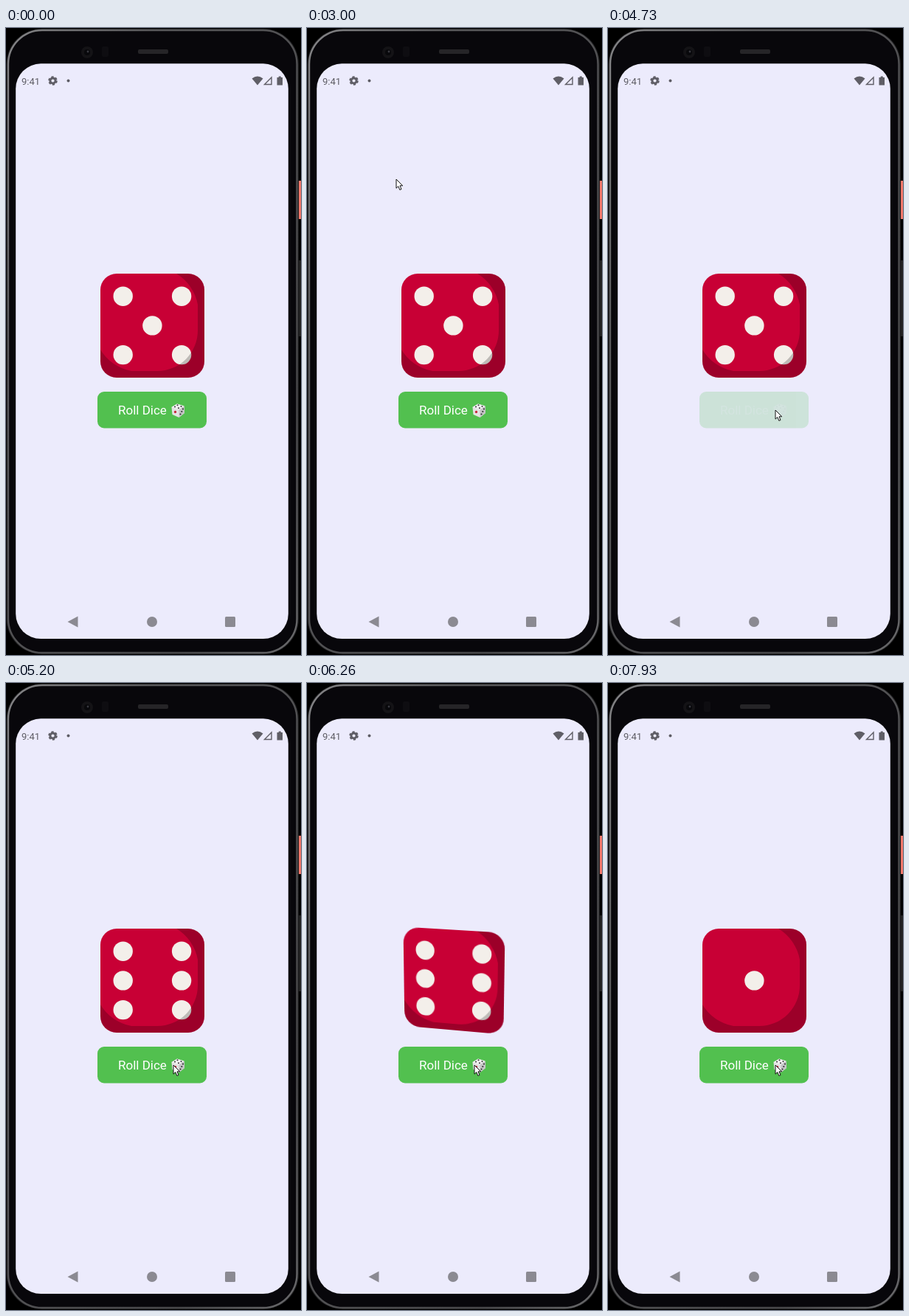
Animation of 400x850 px, one loop 8 s. Source, as an HTML page:

```html
<!DOCTYPE html>
<html lang="en">
<head>
<meta charset="utf-8">
<title>Roll Dice</title>
<style>
  html, body { margin: 0; width: 100%; height: 100%; overflow: hidden; background: #000; }
  #stage { position: relative; width: 400px; height: 850px; overflow: hidden; }
  svg { position: absolute; left: 0; top: 0; }
  text { font-family: Roboto, sans-serif; }
  #die {
    position: absolute; left: 127.5px; top: 333.2px; width: 140.5px; height: 140.5px;
    border-radius: 22px; overflow: hidden; background: #c80035;
  }
</style>
</head>
<body>
<div id="stage">
  <svg width="400" height="850">
    <defs>
      <linearGradient id="rim" x1="0" y1="0" x2="1" y2="1">
        <stop offset="0" stop-color="#858587"/>
        <stop offset=".25" stop-color="#59595b"/>
        <stop offset=".8" stop-color="#48484a"/>
        <stop offset="1" stop-color="#6a6a6c"/>
      </linearGradient>
    </defs>
    <!-- phone body -->
    <rect x="396" y="207" width="6" height="52" rx="1" fill="#f0776a"/>
    <rect x="397" y="315" width="3" height="103" fill="#222"/>
    <rect x=".5" y="1" width="396.5" height="848" rx="48" fill="#1b1b1d"/>
    <rect x="3" y="3" width="391.5" height="844" rx="46" fill="#08070b" stroke="url(#rim)" stroke-width="2.4"/>
    <circle cx="110" cy="33" r="8" fill="#141316"/>
    <circle cx="110" cy="33" r="4" fill="#08080b"/>
    <circle cx="111" cy="32" r="1.4" fill="#3a3a40"/>
    <rect x="130" y="25" width="9" height="14" rx="2" fill="#0e0d11"/>
    <rect x="179" y="29" width="41" height="6" rx="2" fill="#262528"/>
    <rect x="13.2" y="48.3" width="369.6" height="779.8" rx="34" fill="#ecebfc"/>

    <!-- status bar -->
    <g fill="#5f5e66">
      <text x="21" y="76.5" font-size="13">9:41</text>
      <circle cx="63.5" cy="71.5" r="3.6" fill="none" stroke="#5f5e66" stroke-width="3"/>
      <circle cx="63.5" cy="71.5" r="5.4" fill="none" stroke="#5f5e66" stroke-width="1.8" stroke-dasharray="3.2 2.455"/>
      <circle cx="84.5" cy="71.5" r="2"/>
      <path d="M333.5 68.5Q341 62.5 348.5 68.5L341 77.5Z"/>
      <path d="M350.5 76.5H360V67Z" fill="none" stroke="#5f5e66" stroke-width="1.4"/>
      <path d="M367.5 67H369.7V65.5H372.8V67H375V77.5H367.5Z"/>
    </g>

    <!-- navigation bar -->
    <g fill="#8b8a92">
      <path d="M83.5 805L97.5 797.5V812.5Z"/>
      <circle cx="198" cy="805" r="7"/>
      <rect x="297" y="798" width="14" height="14" rx="1.5"/>
    </g>

    <g id="button">
      <rect x="124" y="493" width="148" height="49.5" rx="9" fill="#52c04f"/>
      <g id="label">
        <text x="152" y="524.2" font-size="17" fill="#fff">Roll Dice</text>
        <path d="M224.5 514L232 509.5L241.5 512.5L242 522L234.5 528L225.5 524Z" fill="#e3e3e3"/>
        <path d="M224.5 514L232 509.5L241.5 512.5L234.5 517.5Z" fill="#f0f0f0"/>
        <path d="M234.5 517.5L241.5 512.5L242 522L234.5 528Z" fill="#c4c4c6"/>
        <g fill="#333">
          <circle cx="229" cy="513.5" r="1"/><circle cx="232.5" cy="511.3" r="1"/>
          <circle cx="234" cy="515.3" r="1"/><circle cx="237.5" cy="513" r="1"/>
          <circle cx="236.5" cy="523.5" r="1.1"/><circle cx="240" cy="516.5" r="1.1"/>
          <circle cx="238.3" cy="520" r="1.1"/>
        </g>
        <circle cx="229.5" cy="520.5" r="1.7" fill="#c7283a"/>
      </g>
    </g>
  </svg>

  <div id="die">
    <svg width="141" height="141">
      <g id="pips" fill="#f3efea"></g>
      <path fill-rule="evenodd" fill-opacity=".22"
        d="M0 0H141V141H0ZM0 0H103A62 62 0 0 1 132 42V77A55 55 0 0 1 77 132H42A62 62 0 0 1 0 103Z"/>
    </svg>
  </div>

  <svg width="400" height="850">
    <path id="cursor" d="M0 0V12.2L2.8 9.6L4.8 14.4L7 13.5L5 8.8H8.7Z" fill="#fff" stroke="#111" stroke-linejoin="round"/>
  </svg>
</div>
<script>
const LOOP = 8000, SPIN = 400, FADE = 250, HOLD = 110, FACE_DELAY = 20;
// [release time, face shown afterwards]
const rolls = [[4730, 6], [5318, 3], [5909, 6], [6560, 4], [7212, 1]];
// [time, x, y]
const path = [[1860, 402, 300], [2660, 128, 200], [3000, 121, 205], [3500, 140, 250], [4400, 227, 518]];

const $ = id => document.getElementById(id);
const clamp = v => Math.max(0, Math.min(1, v));
const inOut = (u, power) => u < .5 ? (2 * u) ** power / 2 : 1 - (2 - 2 * u) ** power / 2;

function pipsOf(n) {
  const spots = [];
  if (n % 2) spots.push([0, 0]);
  if (n > 1) spots.push([-1, -1], [1, 1]);
  if (n > 3) spots.push([1, -1], [-1, 1]);
  if (n === 6) spots.push([-1, 0], [1, 0]);
  return spots.map(([x, y]) =>
    `<circle cx="${70.4 + x * 39.7}" cy="${70.4 + y * 39.7}" r="13.2"/>`).join('');
}

let shown;
function showFace(n) {
  if (n === shown) return;
  shown = n;
  $('pips').innerHTML = pipsOf(n);
}

function moveCursor(t) {
  $('cursor').style.display = t < path[0][0] ? 'none' : '';
  let [, x, y] = path[0];
  for (let i = 1; i < path.length; i++) {
    const [t0, x0, y0] = path[i - 1], [t1, x1, y1] = path[i];
    if (t < t0) break;
    const u = inOut(clamp((t - t0) / (t1 - t0)), 1.4);
    x = x0 + (x1 - x0) * u;
    y = y0 + (y1 - y0) * u;
  }
  $('cursor').setAttribute('transform', `translate(${x} ${y})`);
}

function draw(t) {
  let face = 5, angle = 0, opacity = 1;
  for (const [release, next] of rolls) {
    const age = t - release;
    if (age >= -HOLD) opacity = .2 + .8 * inOut(clamp(age / FADE), 2);
    if (age >= 0) angle = 360 * inOut(clamp(age / SPIN), 1.72);
    if (age >= FACE_DELAY) face = next;
  }
  showFace(face);
  $('die').style.transform = `perspective(1280px) rotateX(${angle}deg) rotateY(${angle}deg)`;
  // the label fades on top of its fading button
  $('button').setAttribute('opacity', opacity);
  $('label').setAttribute('opacity', opacity);
  moveCursor(t);
}

const start = performance.now();
function tick() {
  draw((performance.now() - start) % LOOP);
  requestAnimationFrame(tick);
}
tick();
</script>
</body>
</html>
```
